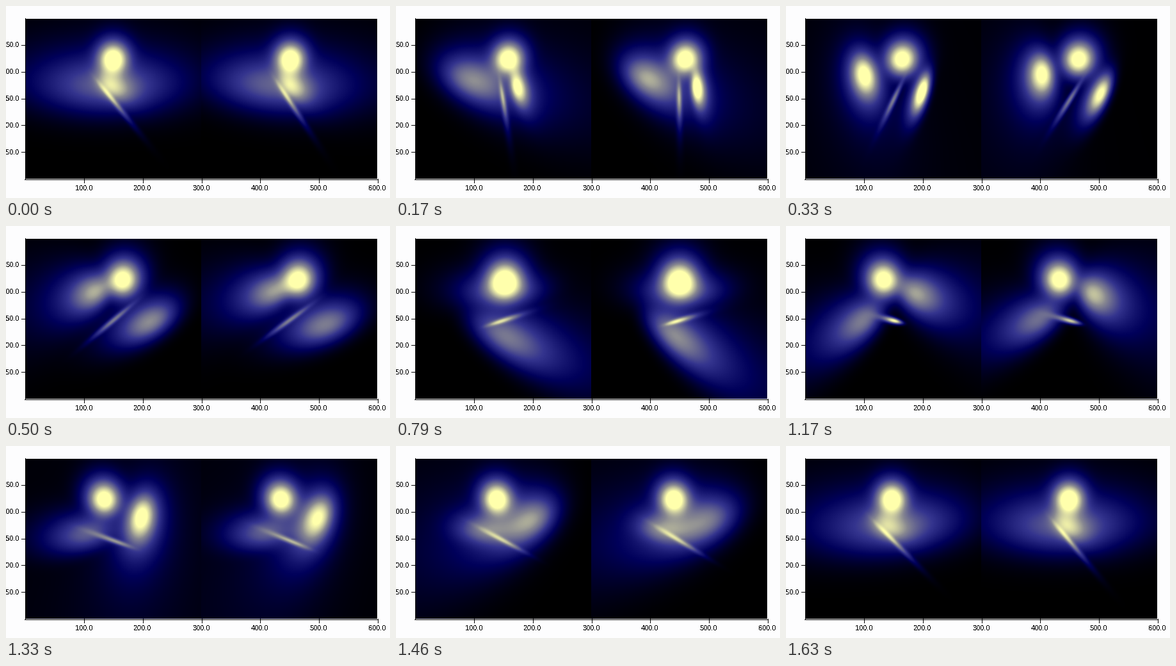
Recreate the animation shown at these times as a matplotlib script. Size 600x300 px, loop 1.68 s.

```python
import numpy as np
import matplotlib.pyplot as plt
from functools import partial
from matplotlib.animation import FuncAnimation
from matplotlib.colors import LinearSegmentedColormap, PowerNorm

W, H = 600, 300
STEPS, FPS = 40, 24               # poses per turn and their rate
TICK, LOOP = 10, 1680             # ms
LEFT, TOP, PANEL_W, PANEL_H = 30, 20, 275, 250
RIGHT, BOTTOM = LEFT + 2 * PANEL_W, TOP + PANEL_H
DIST = 150.0                      # camera distance, also the focal length in px
TILT = np.radians(27)             # camera elevation
EYE_SHIFT = np.radians(8)         # right panel runs slightly ahead
PEAK = 0.85
PAPER = "#fdfdfe"


def make_blob(center, axis, sigmas, gain):
    """3D Gaussian: sigmas along its axis, sideways and upright."""
    u = np.array(axis, float)
    u /= np.linalg.norm(u)
    side = np.cross(u, (0, 1, 0))
    side /= np.linalg.norm(side)
    basis = np.array([u, side, np.cross(side, u)])
    return np.array(center, float), basis / np.array(sigmas)[:, None], gain


BLOBS = [
    make_blob((0, 57, -12.5), (1, 0, 0), (13, 13, 13), 0.08),     # ball
    make_blob((-6, 36, 38), (1, 0, 0), (38, 11, 17), 0.03),       # cigar
    make_blob((0, 3, -50), (1, 0, 1), (32, 6, 19), 0.05),         # disc
    make_blob((0, -3, 0), (1, -0.86, 1), (24, 2.7, 2.7), 0.13),   # needle
]

# Rays through every pixel of one panel, before the turn
s, c = np.sin(TILT), np.cos(TILT)
px, py = np.meshgrid(np.arange(PANEL_W) + 0.5 - PANEL_W / 2,
                     PANEL_H / 2 - np.arange(PANEL_H) - 0.5)
RAYS = np.stack([px, py * c - DIST * s, -py * s - DIST * c], axis=-1)
RAYS /= np.linalg.norm(RAYS, axis=-1, keepdims=True)
EYE = np.array([0, DIST * s, DIST * c])


def render(theta):
    """Integrate all blobs along the rays of a camera turned by theta."""
    ct, st = np.cos(theta), np.sin(theta)
    turn = np.array([[ct, 0, st], [0, 1, 0], [-st, 0, ct]])
    eye, rays = turn @ EYE, RAYS @ turn.T
    total = np.zeros((PANEL_H, PANEL_W))
    for center, shape, gain in BLOBS:
        o = shape @ (eye - center)
        d = rays @ shape.T
        a = (d * d).sum(axis=-1)
        near = d @ o / np.sqrt(a)
        ahead = 1 / (1 + np.exp(np.clip(1.702 * near, -50, 50)))
        total += gain * ahead * np.exp(-0.5 * (o @ o - near ** 2)) / np.sqrt(a)
    return total


def stereo(step):
    theta = 2 * np.pi * step / STEPS
    return np.hstack([render(theta), render(theta + EYE_SHIFT)])


def step_at(ms):
    """Pose shown at a time; pose changes fall on the nearest 10 ms."""
    return min(int((ms + 4.9) * FPS / 1000), STEPS - 1)


glow = LinearSegmentedColormap.from_list(
    "glow", ["#000000", "#00005a", "#34348e", "#878791", "#ffffac"], N=1024)

plt.rcParams["text.antialiased"] = False
fig = plt.figure(figsize=(W / 100, H / 100), dpi=100, facecolor=PAPER)
ax = fig.add_axes([0, 0, 1, 1])
ax.axis("off")

views = [stereo(step) for step in range(STEPS)]
image = ax.imshow(views[0], cmap=glow, norm=PowerNorm(0.5, 0, PEAK, clip=True),
                  aspect="auto", extent=(LEFT, RIGHT, BOTTOM, TOP),
                  interpolation="nearest")
ax.set_xlim(0, W)
ax.set_ylim(H, 0)

line = partial(ax.plot, color="black", lw=0.72, antialiased=False,
               solid_capstyle="butt")


def label(x, y, value, ha):
    ax.text(x, y, f"{value:.1f}", ha=ha, va="center_baseline", color="black",
            family="Liberation Sans", fontsize=11 * 0.72)


line([LEFT - 0.5] * 2, [TOP - 1, BOTTOM + 1])
line([LEFT - 1, RIGHT + 1], [BOTTOM + 0.5] * 2)
for value in range(100, 601, 100):
    x = int(LEFT + value * 2 * PANEL_W / 600) + 0.5
    line([x, x], [BOTTOM, BOTTOM + 6])
    label(x, 284.5, value, "center")
for value in range(50, 251, 50):
    y = int(TOP - 1 + value * PANEL_H / 300) + 0.5
    line([LEFT - 6, LEFT], [y, y])
    label(20.5, y, value, "right")


def update(i):
    image.set_data(views[step_at(i * TICK)])
    return [image]


anim = FuncAnimation(fig, update, frames=LOOP // TICK, interval=TICK,
                     repeat=True, repeat_delay=0, blit=False)
plt.show()
```
